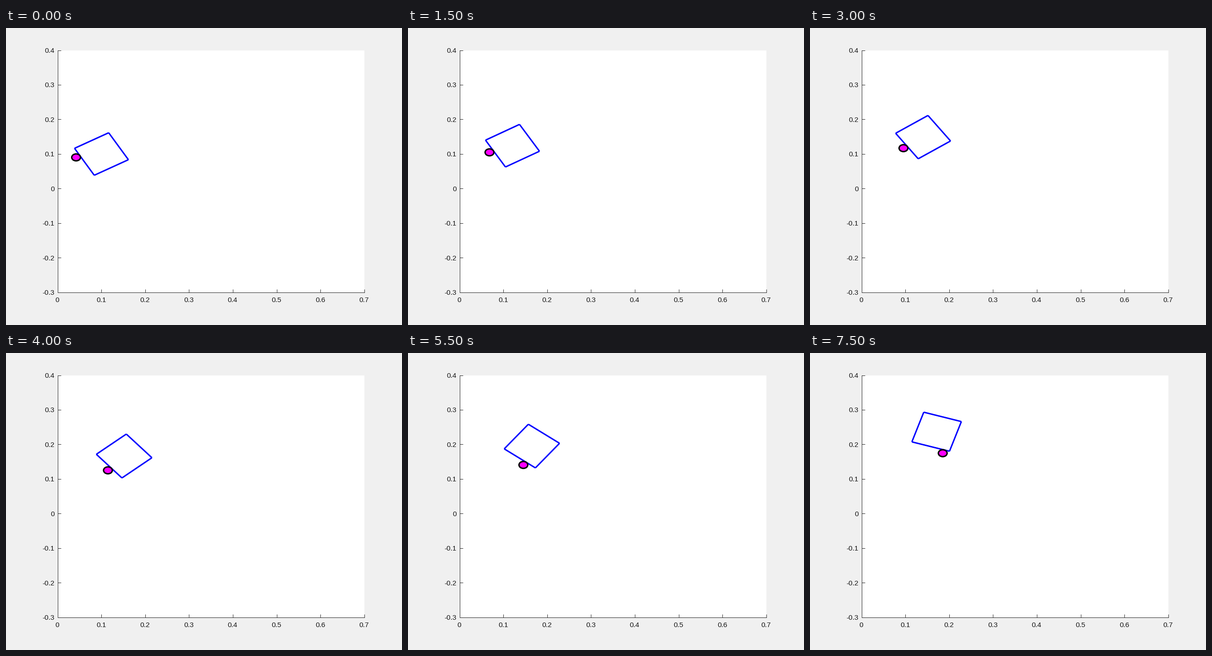
A matplotlib script that plays this animation: 864 by 648 pixels, repeating every 8 s.

```python
import numpy as np
import matplotlib.pyplot as plt
from matplotlib.animation import FuncAnimation
from matplotlib.patches import Circle

W, H = 864, 648
FRAMES, STEP = 16, 500
LEFT, RIGHT, TOP, BOTTOM = 112.7, 781.9, 48.6, 576.7
INK, TEXT = "#262626", "#161616"
LINE = 3.09

# Points are complex numbers x + iy in data units
HALF, RADIUS = 0.045, 0.01
START = 0.1 + 0.1j
PUSH, SLIP = 0.0199, 0.007
CORNERS = HALF * np.array([-1 - 1j, -1 + 1j, 1 + 1j, 1 - 1j])


def tilt(t):
    """Box angle: steady at first, then turning faster as the pusher slides."""
    return np.radians(30 + 56.5 * (1 - np.cos(0.2 * np.maximum(t - 0.9, 0))))


def centre(t, n=200):
    """The box moves at a constant velocity in its own turning frame."""
    mid = (np.arange(n) + 0.5) * t / n
    return START + (PUSH + 1j * SLIP) * t * np.mean(np.exp(1j * tilt(mid)))


plt.rcParams["font.family"] = "Liberation Sans"
fig = plt.figure(figsize=(W / 72, H / 72), dpi=72, facecolor="#f0f0f0")
ax = fig.add_axes([LEFT / W, 1 - BOTTOM / H, (RIGHT - LEFT) / W, (BOTTOM - TOP) / H],
                  facecolor="white")
xticks = np.arange(8) / 10
yticks = np.arange(-3, 5) / 10
ax.set(xlim=(0, 0.7), ylim=(-0.3, 0.4), xticks=xticks, yticks=yticks)
ax.tick_params(direction="in", length=6.7, width=1, color=INK,
               labelbottom=False, labelleft=False)
ax.spines[["top", "right"]].set_visible(False)
for side in ("left", "bottom"):
    ax.spines[side].set(color=INK, linewidth=1)


def label(px, py, value, ha):
    fig.text(px / W, 1 - py / H, f"{value:g}", ha=ha, va="baseline",
             fontsize=15.43, color=TEXT)


for x in xticks:
    label(LEFT - 0.7 + x / 0.7 * (RIGHT - LEFT), 598.4, x, "center")
for y in yticks:
    label(106, BOTTOM - (y + 0.3) / 0.7 * (BOTTOM - TOP) + 5.4, y, "right")

edges = [ax.plot([], [], color="#0000ff", lw=LINE, solid_capstyle="butt", zorder=3)[0]
         for _ in CORNERS]
pusher = Circle((0, 0), RADIUS, facecolor="#ff00ff", edgecolor="black",
                linewidth=LINE, zorder=4)
ax.add_patch(pusher)


def update(frame):
    t = frame * STEP / 1000
    origin, turn = centre(t), np.exp(1j * tilt(t))
    points = origin + CORNERS * turn
    for edge, a, b in zip(edges, points, np.roll(points, -1)):
        edge.set_data([a.real, b.real], [a.imag, b.imag])
    # The pusher slides steadily down the box's left face
    contact = origin + (-HALF - RADIUS + 1j * (0.0205 - SLIP * t)) * turn
    pusher.center = contact.real, contact.imag
    return [*edges, pusher]


anim = FuncAnimation(fig, update, frames=FRAMES, interval=STEP,
                     repeat=True, repeat_delay=0, blit=False)
plt.show()
```
